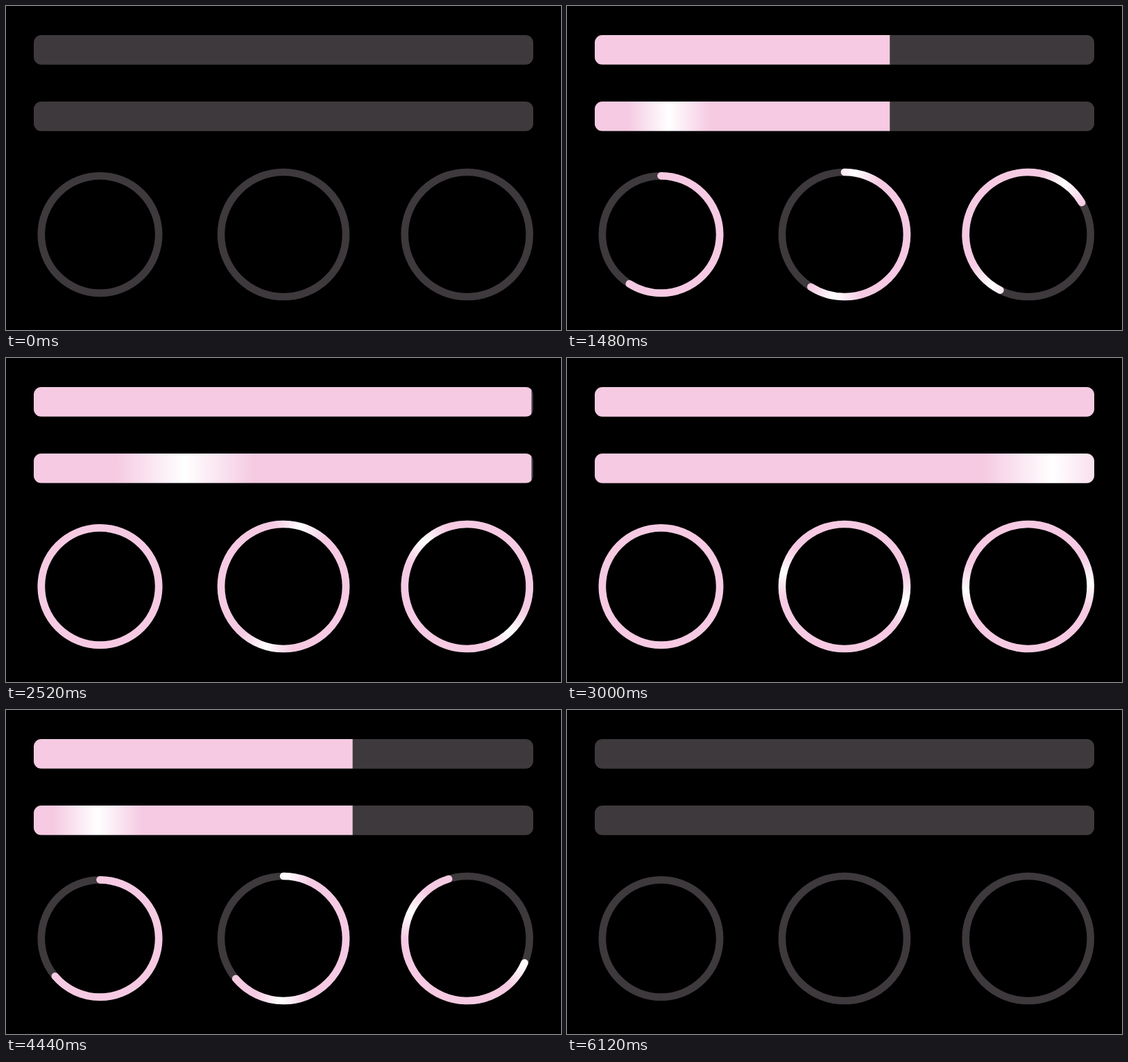
These frames come from a looping animation (800x468 px, 6.16 s). An HTML page with a canvas:

```html
<!DOCTYPE html>
<html lang="en">
<head>
<meta charset="utf-8">
<title>Progress indicators</title>
<style>
  html, body { margin: 0; width: 100%; height: 100%; overflow: hidden; background: #000; }
  canvas { display: block; width: 800px; height: 468px; }
</style>
</head>
<body>
<canvas id="stage" width="800" height="468"></canvas>
<script>
const ctx = document.getElementById('stage').getContext('2d');

const LOOP = 6160;
const TRACK = '#3d393c';
const PINK = '#f5cae2';
const WHITE = '#fff';
const TAU = Math.PI * 2;
const rad = deg => deg * Math.PI / 180;

const BAR = { x: 40, w: 720, h: 42.67, r: 11 };
const STROKE = 10.67;
const RING_Y = 330;

// [time in ms, filled share]
const FILL = [
  [60, 0], [1480, 0.5903], [1960, 0.7778], [2530, 1],
  [3485, 1], [3800, 0.88], [5080, 0.3975], [6115, 0]
];

function progress(t) {
  const i = FILL.findIndex(([time]) => t < time);
  if (i < 1) return 0;
  const [t0, v0] = FILL[i - 1];
  const [t1, v1] = FILL[i];
  return v0 + (v1 - v0) * (t - t0) / (t1 - t0);
}

// The glint repeats once per second.
const glintPhase = t => (t / 1000 + 0.825) % 1;

function barGlint(width, phase) {
  const half = 0.14 * width;
  const mid = BAR.x + width * (1.28 * phase - 0.14);
  const g = ctx.createLinearGradient(mid - half, 0, mid + half, 0);
  g.addColorStop(0, PINK);
  g.addColorStop(0.5, WHITE);
  g.addColorStop(1, PINK);
  return g;
}

// Two opposite glints; angles run clockwise from twelve o'clock.
function ringGlint(x, deg) {
  const half = 25 / 360;
  const g = ctx.createConicGradient(rad(deg - 180), x, RING_Y);
  for (const mid of [0.25, 0.75]) {
    g.addColorStop(mid - half, PINK);
    g.addColorStop(mid, WHITE);
    g.addColorStop(mid + half, PINK);
  }
  return g;
}

function drawBar(y, p, paint) {
  ctx.save();
  ctx.beginPath();
  ctx.roundRect(BAR.x, y, BAR.w, BAR.h, BAR.r);
  ctx.fillStyle = TRACK;
  if (p < 1) ctx.fill();
  ctx.fillStyle = paint;
  if (p >= 1) {
    ctx.fill();
  } else if (p > 0) {
    ctx.clip();
    ctx.fillRect(BAR.x, y, BAR.w * p, BAR.h);
  }
  ctx.restore();
}

function drawRing(x, r, p, paint, startDeg = 0) {
  const start = rad(startDeg - 90);
  ctx.lineWidth = STROKE;
  ctx.lineCap = 'round';
  const arc = (from, to, style) => {
    ctx.beginPath();
    ctx.arc(x, RING_Y, r, from, to);
    ctx.strokeStyle = style;
    ctx.stroke();
  };
  if (p < 1) arc(0, TAU, TRACK);
  if (p > 0) arc(start, start + TAU * p, paint);
}

function draw(t) {
  const p = progress(t);
  const phase = glintPhase(t);
  const glintDeg = 180 * phase - 46;
  const spin = (73.3 + 0.09 * t) % 360;

  ctx.fillStyle = '#000';
  ctx.fillRect(0, 0, 800, 468);

  drawBar(42, p, PINK);
  drawBar(138, p, barGlint(BAR.w * p, phase));

  drawRing(135.5, 84.67, p, PINK);
  drawRing(400, 90, p, ringGlint(400, glintDeg));
  drawRing(664.67, 90, p, ringGlint(664.67, glintDeg + spin), spin);
}

const begin = performance.now();
function tick() {
  draw((performance.now() - begin) % LOOP);
  requestAnimationFrame(tick);
}
tick();
</script>
</body>
</html>
```
